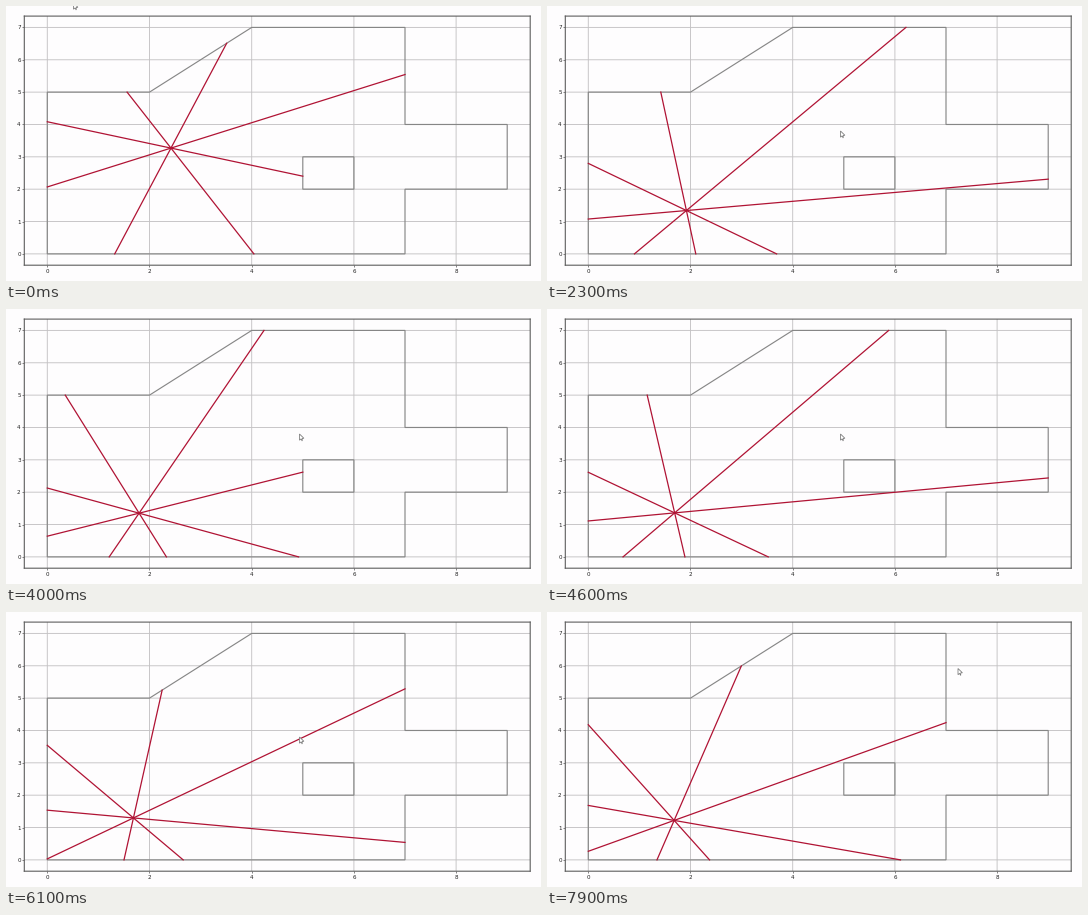
Recreate the animation shown at these times as a matplotlib script. Size 535 by 275 pixels, loop 8 s.

```python
import numpy as np
import matplotlib.pyplot as plt
from matplotlib.animation import FuncAnimation
from matplotlib.patches import Polygon, Rectangle
from matplotlib.ticker import MultipleLocator

W, H, DPI = 535, 275, 100
FRAMES, STEP = 80, 100
PX = 72 / DPI  # one pixel in points
RAYS = 8
plt.rcParams["path.snap"] = False

ROOM = np.array([(0, 0), (0, 5), (2, 5), (4, 7), (7, 7),
                 (7, 4), (9, 4), (9, 2), (7, 2), (7, 0)], float)
BLOCK = Rectangle((5, 2), 1, 1).get_corners().astype(float)
ARROW = np.array([(0, 0), (0, 6.2), (1.5, 4.9), (2.7, 7), (2.7, 4.4), (4.4, 4.3)])


def ramp(t, start, end):
    """Linear progress from 0 to 1 between two times in seconds."""
    return np.clip((t - start) / (end - start), 0, 1)


def robot(t):
    """Drive down, shuttle right and back, then drift."""
    drive, out = ramp(t, 0, 1.1), ramp(t, 1.1, 2.3)
    back, drift = ramp(t, 3.3, 4.6), ramp(t, 4.6, 7.9)
    return np.array([2.42 - 0.72 * drive + 0.22 * out - 0.23 * back - 0.01 * drift,
                     3.27 - 2.03 * drive + 0.10 * out + 0.02 * back - 0.14 * drift])


def heading(t):
    """Turn right in bursts with one short swing left."""
    deg = (26.4 - 1.3 * ramp(t, 0, 1.1) - 17.3 * ramp(t, 1.1, 1.82)
           - 44.4 * ramp(t, 2.7, 4.55) - 16.5 * ramp(t, 4.6, 6.1)
           + 11.6 * ramp(t, 6.1, 6.6) - 18.9 * ramp(t, 6.7, 7.9))
    return np.radians(deg)


def mouse(t):
    """Pointer tip in pixels: sweep right, return, later move to the wall."""
    sweep, rest, leave = ramp(t, 0, 0.4), ramp(t, 0.4, 0.9), ramp(t, 7.2, 7.7)
    return np.array([67.5 + 449.5 * sweep - 223.5 * rest + 117.5 * leave,
                     -3 + 63 * sweep + 65 * rest - 68.5 * leave])


def cross(a, b):
    return a[..., 0] * b[..., 1] - a[..., 1] * b[..., 0]


starts = np.vstack([ROOM, BLOCK])
spans = np.vstack([np.roll(p, -1, axis=0) - p for p in (ROOM, BLOCK)])


def cast(pos, angle):
    """Return the point where a ray first meets a wall."""
    d = np.array([np.cos(angle), np.sin(angle)])
    den = cross(d, spans)
    den = np.where(abs(den) < 1e-9, 1e-9, den)
    gap = starts - pos
    dist, along = cross(gap, spans) / den, cross(gap, d) / den
    hit = (dist > 0) & (along >= 0) & (along <= 1)
    return pos + d * dist[hit].min()


fig = plt.figure(figsize=(W / DPI, H / DPI), dpi=DPI, facecolor="#fefdfe")
left, right, top, bottom = 18.3, 524.2, 10.1, 259.2
ax = fig.add_axes([left / W, 1 - bottom / H, (right - left) / W, (bottom - top) / H],
                  facecolor="#fefdfe")
ax.set(xlim=(-0.45, 9.45), ylim=(-0.35, 7.35))
ax.xaxis.set_major_locator(MultipleLocator(2))
ax.yaxis.set_major_locator(MultipleLocator(1))
ax.set_axisbelow(True)
ax.grid(color="#c4c2c4", lw=0.9 * PX)
ax.tick_params(length=2 * PX, width=0.7 * PX, pad=1.6 * PX, color="#555555",
               labelsize=5.6 * PX, labelcolor="#222222",
               labelfontfamily="DejaVu Sans")
ax.spines[:].set(color="#5c5c5c", linewidth=1.1 * PX)

for shape in (ROOM, BLOCK):
    ax.add_patch(Polygon(shape, fill=False, ec="#868686", lw=1.15 * PX, zorder=2))

rays = [ax.plot([], [], color="#b01334", lw=1.25 * PX, zorder=3)[0]
        for _ in range(RAYS)]

page = fig.add_axes([0, 0, 1, 1])
page.set(xlim=(0, W), ylim=(H, 0))
page.axis("off")
pointer = page.add_patch(Polygon(ARROW, fc="white", ec="#7a7a7a", lw=0.8 * PX))


def draw(i):
    t = i * STEP / 1000
    pos, angle = robot(t), heading(t)
    for k, ray in enumerate(rays):
        ray.set_data(*zip(pos, cast(pos, angle + k * 2 * np.pi / RAYS)))
    pointer.set_xy(ARROW + mouse(t))
    return [*rays, pointer]


anim = FuncAnimation(fig, draw, frames=FRAMES, interval=STEP,
                     repeat=True, repeat_delay=0, blit=False)
plt.show()
```
